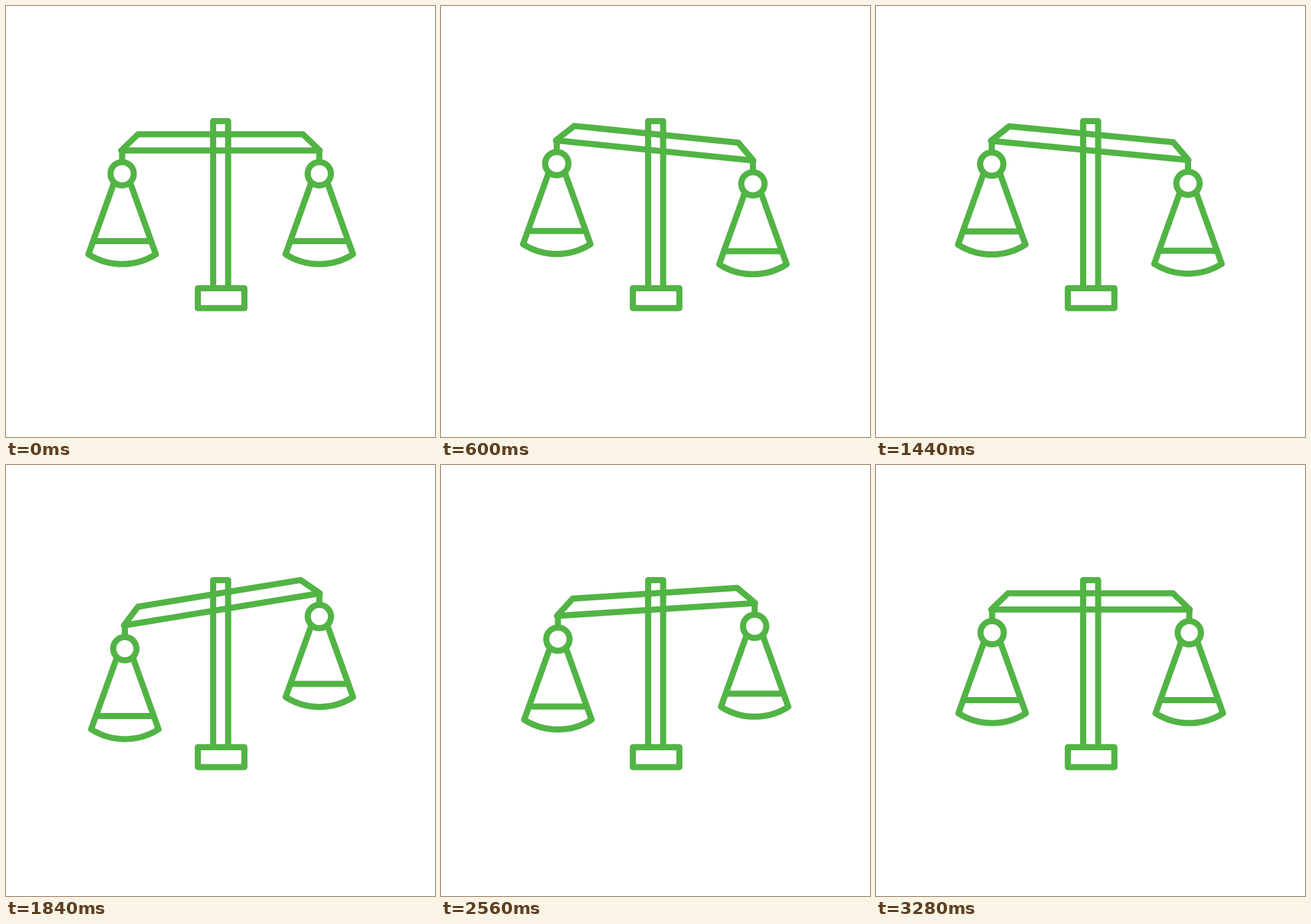
An HTML page for the animation above (4000 ms loop, 700 px wide and 704 px high).

```html
<!DOCTYPE html>
<html lang="en">
<head>
<meta charset="utf-8">
<title>Balance scale</title>
<style>
  html, body { margin: 0; width: 100%; height: 100%; overflow: hidden; background: #fff; }
  svg { display: block; width: 700px; height: 704px; }
  .ink { fill: none; stroke: #52b445; stroke-width: 10; stroke-linejoin: round; stroke-linecap: round; }
</style>
</head>
<body>
<svg viewBox="0 0 700 704">
  <defs>
    <g id="pan">
      <path d="M189.5 236V254"/>
      <circle cx="189.5" cy="274" r="19"/>
      <path d="M176.2 289L134.5 405.5A102 102 0 0 0 244.5 405.5L202.8 289M142.5 384H236.5"/>
    </g>
  </defs>
  <g class="ink">
    <path d="M338 461V188H362.5V461"/>
    <rect x="313" y="461" width="76" height="32.5"/>
    <path id="beam" d="M188 236L215.5 209.5H484.5L512 236Z"/>
    <use id="left" href="#pan"/>
    <use id="right" href="#pan"/>
  </g>
</svg>
<script>
  const LOOP = 4000, STEP = 40, TILT = 10.8;
  const PIVOT = { x: 350, y: 222 };
  const ARM = 162, DROP = 14, PAN_GAP = 321.7;

  // start ms, end ms, start angle, end angle, easing handles x1 and x2
  const SWINGS = [
    [0, 1145, 0, TILT, 0.42, 0.58],
    [1145, 2030, TILT, -TILT, 0.45, 0.48],
    [2030, 3300, -TILT, 0, 0.24, 0.293]
  ];

  const beam = document.getElementById("beam");
  const left = document.getElementById("left");
  const right = document.getElementById("right");

  // Cubic bezier easing with flat handles (x1, 0) and (x2, 1)
  function ease(x, x1, x2) {
    let lo = 0, hi = 1;
    for (let i = 0; i < 24; i++) {
      const t = (lo + hi) / 2, u = 1 - t;
      if (3 * u * u * t * x1 + 3 * u * t * t * x2 + t * t * t < x) lo = t;
      else hi = t;
    }
    return lo * lo * (3 - 2 * lo);
  }

  function angleAt(ms) {
    const swing = SWINGS.find(s => ms < s[1]);
    if (!swing) return 0;
    const [start, end, from, to, x1, x2] = swing;
    return from + (to - from) * ease((ms - start) / (end - start), x1, x2);
  }

  // The pan hangs upright and follows its end of the beam
  function hang(pan, side, rad, offset) {
    const c = Math.cos(rad), s = Math.sin(rad), arm = side * ARM;
    const dx = arm * c - DROP * s - arm;
    const dy = arm * s + DROP * c - DROP;
    pan.setAttribute("transform", `translate(${offset + dx} ${dy})`);
  }

  function draw(now) {
    const ms = Math.floor((now % LOOP) / STEP) * STEP;
    const angle = angleAt(ms), rad = angle * Math.PI / 180;
    beam.setAttribute("transform", `rotate(${angle} ${PIVOT.x} ${PIVOT.y})`);
    hang(left, -1, rad, 0);
    hang(right, 1, rad, PAN_GAP);
  }

  const begin = performance.now();
  function tick() {
    draw(performance.now() - begin);
    requestAnimationFrame(tick);
  }
  tick();
</script>
</body>
</html>
```
